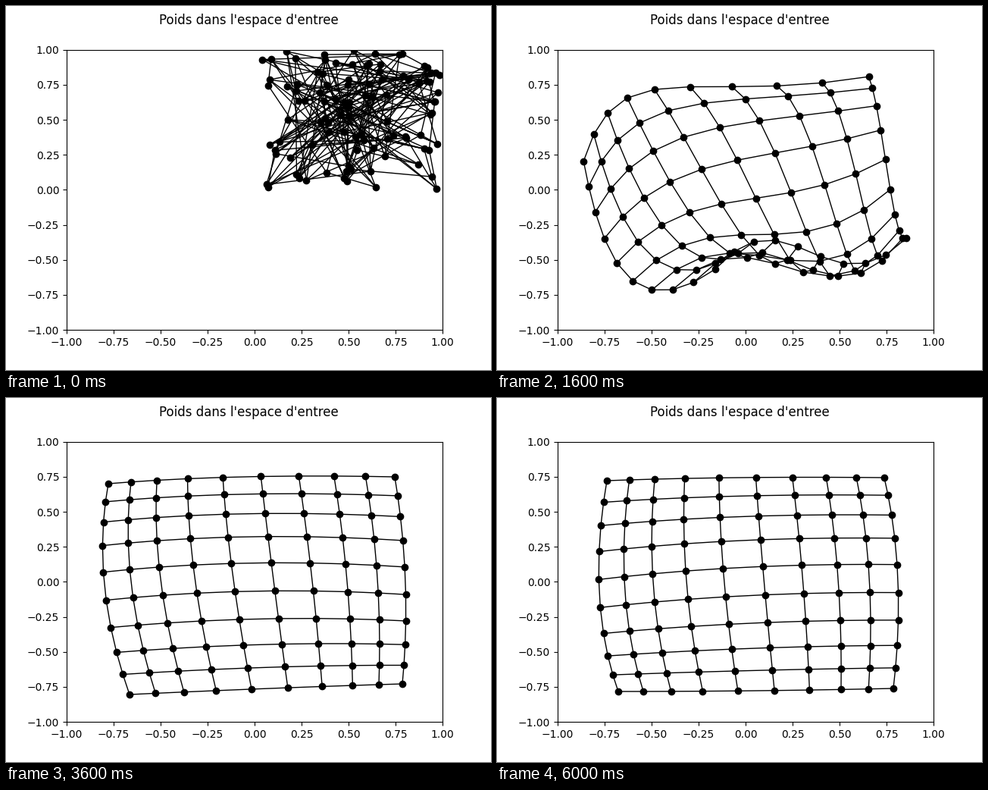
Animation, 640 px wide and 480 px high, one loop 6200 ms. Source, as a matplotlib script:

```python
import numpy as np
import matplotlib.pyplot as plt
from matplotlib.animation import FuncAnimation

SIZE = 10
FRAMES = 31


def squeeze(s):
    """Pack the lattice slightly tighter near its borders."""
    return s - 0.2 * np.sin(2 * np.pi * s) / (2 * np.pi)


def basis(count):
    """Lagrange basis of evenly chosen knots, at every lattice index."""
    knots = squeeze(np.linspace(0, 1, count))
    u = squeeze(np.linspace(0, 1, SIZE))
    cols = [np.prod([(u - m) / (k - m) for m in knots if m != k], axis=0)
            for k in knots]
    return np.stack(cols, axis=1)


def surface(*rows):
    """Smooth lattice through a few key points given in stage pixels."""
    b = basis(len(rows))
    px, py = np.einsum("ai,bj,ijc->cab", b, b, np.array(rows))
    return np.stack([(px - 80) / 248 - 1, 1 - (py - 57.6) / 184.8])


start = np.random.default_rng(4).random((2, SIZE, SIZE))

folded = surface(
    [(111, 235), (161, 132), (296, 112), (481, 94)],
    [(146, 337), (230, 243), (356, 201), (502, 164)],
    [(236, 388), (325, 333), (428, 365), (525, 288)],
    [(327, 310), (383, 255), (465, 312), (542, 272)])

opened = surface(
    [(119, 159), (188, 105), (331, 98), (505, 92)],
    [(135, 261), (226, 215), (383, 183), (513, 163)],
    [(157, 354), (280, 315), (422, 294), (525, 255)],
    [(229, 403), (343, 390), (446, 381), (537, 358)])

leaning = surface(
    [(133, 119), (300, 100), (504, 94)],
    [(139, 275), (316, 245), (519, 221)],
    [(183, 396), (376, 387), (528, 371)])

squarer = surface(
    [(135, 113), (311, 104), (513, 104)],
    [(130, 248), (326, 236), (527, 241)],
    [(163, 391), (348, 383), (523, 377)])

wide = surface(
    [(130, 104), (323, 98), (522, 92)],
    [(130, 247), (334, 236), (528, 240)],
    [(153, 388), (350, 377), (524, 377)])

settled = surface(
    [(145, 109), (317, 105), (511, 105)],
    [(135, 258), (326, 242), (529, 238)],
    [(160, 387), (342, 386), (523, 383)])

POSES = [start, folded, opened, leaning, squarer, wide, settled]
STEPS = [0, 6, 11, 15, 18, 25, 30]


def lattice(n):
    """Weights at step n: a fast first unfolding, then a steady drift."""
    k = min(np.searchsorted(STEPS, n, side="right") - 1, len(STEPS) - 2)
    t = (n - STEPS[k]) / (STEPS[k + 1] - STEPS[k])
    if k == 0:
        t = 1 - (1 - t) ** 3
    return POSES[k] + (POSES[k + 1] - POSES[k]) * t


fig, ax = plt.subplots(figsize=(6.4, 4.8), dpi=100)
fig.suptitle("Poids dans l'espace d'entree")
ax.set(xlim=(-1, 1), ylim=(-1, 1))
blank = np.zeros((SIZE, SIZE))
row_lines = ax.plot(blank, blank, "k-", lw=1)
col_lines = ax.plot(blank, blank, "k-", lw=1)
dots, = ax.plot([], [], "ko")


def draw(n):
    x, y = lattice(n)
    for i in range(SIZE):
        row_lines[i].set_data(x[i], y[i])
        col_lines[i].set_data(x[:, i], y[:, i])
    dots.set_data(x.ravel(), y.ravel())
    return [*row_lines, *col_lines, dots]


anim = FuncAnimation(fig, draw, frames=FRAMES, interval=200,
                     repeat=True, repeat_delay=0)
plt.show()
```
